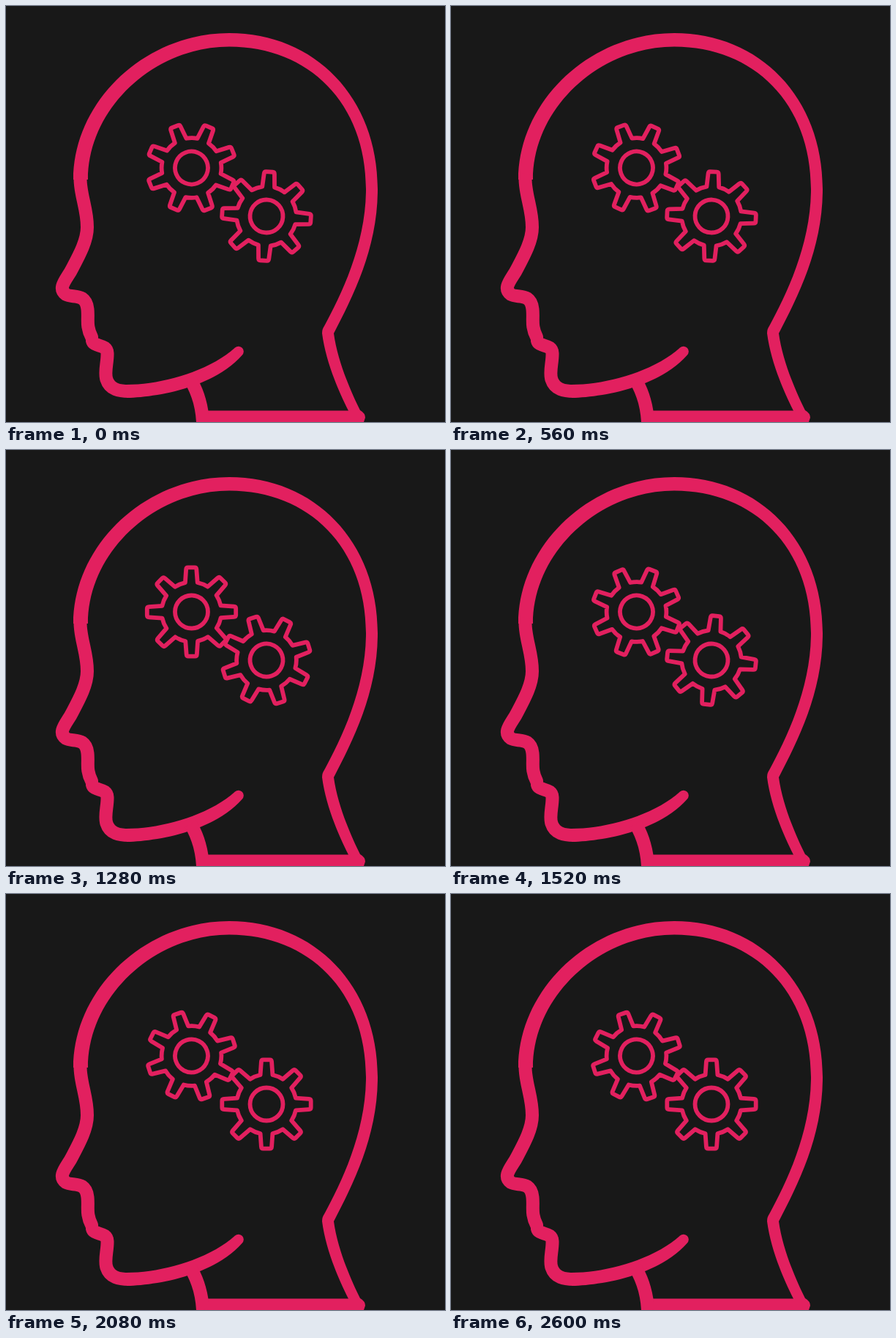
An HTML page for the animation above (2.64 s loop, 600 px wide and 568 px high).

```html
<!DOCTYPE html>
<html>
<head>
<meta charset="utf-8">
<style>
  html, body { margin: 0; height: 100%; overflow: hidden; background: #181818; }
  svg { display: block; width: 100vw; height: 100vh; }
  .fill { fill: #e2205f; }
  .line { fill: none; stroke: #e2205f; stroke-width: 18; stroke-linecap: round; stroke-linejoin: round; }
  .gear { stroke-width: 5.8; }
</style>
</head>
<body>
<svg viewBox="0 0 600 568">
  <!-- skull, nape and base of the neck -->
  <path class="fill" d="M92 237C92 130 190 37 305 37C422 37 508 125 508 250C508 330 475 395 448 447
    C453 485 472 528 484 552Q491 556 491 562L489 568H260V552.500H468C454 525 437 485 432 447
    Q432 441 435 437C458 395 492 325 492 250C492 133 414 55.500 305 55.500C203 55.500 112 139 112 237Z"/>
  <!-- face -->
  <path class="line" d="M101.500 237C102 260 111 277 111 302C111 322 98 344 88 363C80 376 71 386 82 394
    C91 399 109 391 111.500 414C113 428 109 436 117 452"/>
  <path class="line" d="M118 457C120 466 138 461 138.500 474C139 486 134 500 137.500 510C142 524 155 526 168 526"/>
  <path class="fill" d="M165 535C206 534 284 521 322.500 477A7 7 0 0 0 313 466.500C280 497 215 517 165 517Z"/>
  <path class="line" style="stroke-linecap:butt" d="M252 510C264 530 268 550 269 568"/>
  <g id="left" class="line gear"><circle r="22.500"/><path/></g>
  <g id="right" class="line gear"><circle r="22.500"/><path/></g>
</svg>
<script>
const LOOP = 2640, STEP = 40, TEETH = 8;

// Time in ms and the turn of the right gear in degrees
const turns = [[0, 3.8], [560, -42.4], [1000, -82.7], [1520, -129.2],
               [1880, -162.7], [2080, -180], [2600, -225], [2640, -228.5]];

function gearPath() {
  let d = '';
  for (let i = 0; i < TEETH; i++) {
    const a = i * 2 * Math.PI / TEETH, c = Math.cos(a), s = Math.sin(a);
    const p = (x, y) => `${(x * c - y * s).toFixed(2)} ${(x * s + y * c).toFixed(2)} `;
    d += (i ? 'A41 41 0 0 1 ' : 'M') + p(-8.4, -40) +
      'L' + p(-7.1, -58) + 'Q' + p(-6.9, -60.7) + p(-4.5, -60.7) +
      'L' + p(4.5, -60.7) + 'Q' + p(6.9, -60.7) + p(7.1, -58) + 'L' + p(8.4, -40);
  }
  return d + 'A41 41 0 0 1 -8.4 -40Z';
}

function turnAt(t) {
  const i = turns.findIndex(([end]) => end > t);
  const [t0, a0] = turns[i - 1], [t1, a1] = turns[i];
  return a0 + (a1 - a0) * (t - t0) / (t1 - t0);
}

const left = document.getElementById('left'), right = document.getElementById('right');
for (const gear of [left, right]) gear.querySelector('path').setAttribute('d', gearPath());

function draw(now) {
  const turn = turnAt(Math.floor(now % LOOP / STEP) * STEP);
  left.setAttribute('transform', `translate(253.5 221) rotate(${27 - turn})`);
  right.setAttribute('transform', `translate(356 287) rotate(${turn})`);
  requestAnimationFrame(draw);
}
draw(0);
</script>
</body>
</html>
```
